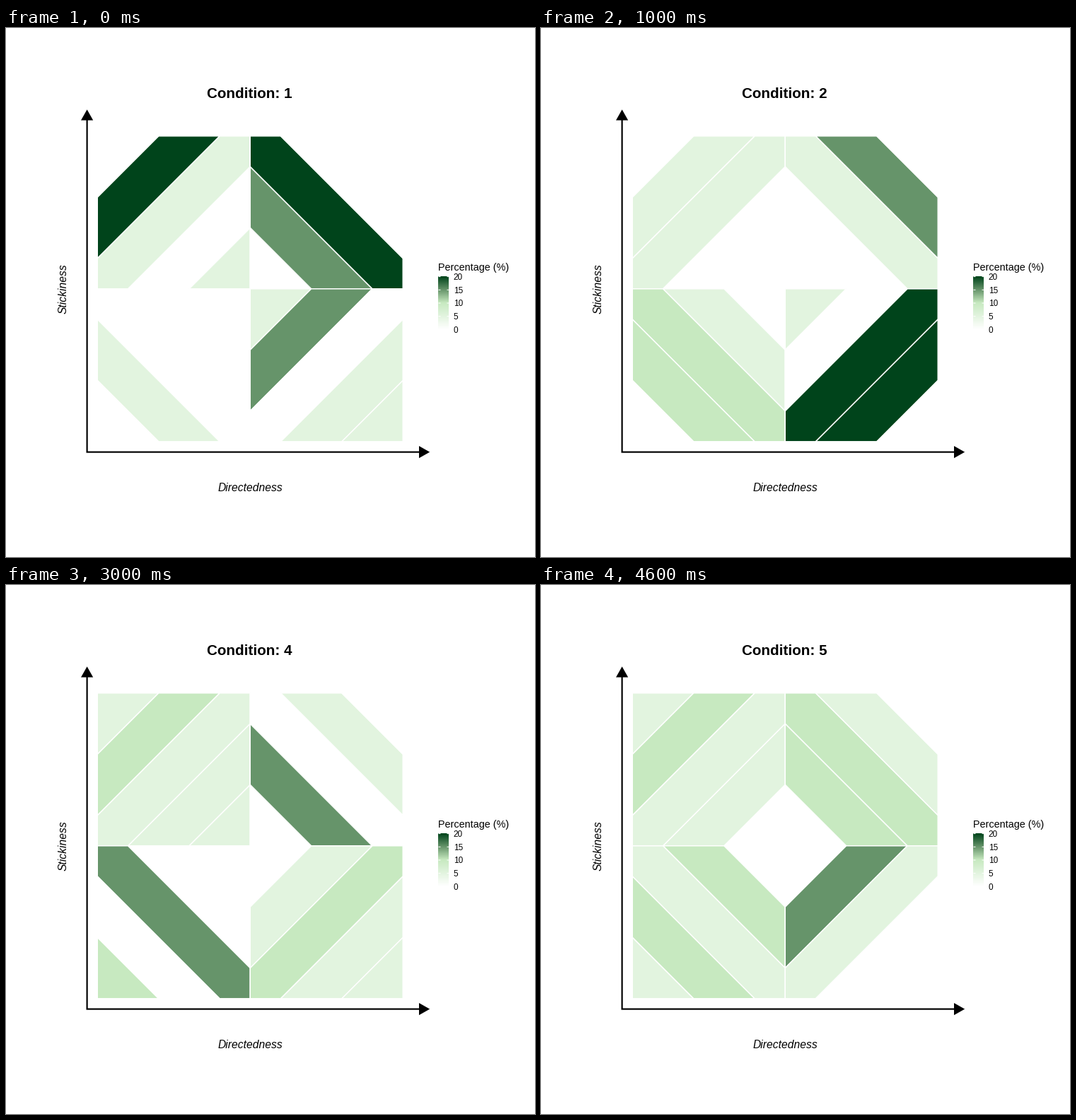
Recreate the animation shown at these times as a matplotlib script. Size 748 px wide and 748 px high, loop 5000 ms.

```python
import numpy as np
import matplotlib.pyplot as plt
from matplotlib.animation import FuncAnimation
from matplotlib.colors import LinearSegmentedColormap
from matplotlib.patches import Polygon

SIZE, DPI = 748, 100
PT = 72 / DPI  # points per pixel
CX, CY, HALF = 345.25, 368.8, 216

SHADES = ["#ffffff", "#e2f4df", "#c7e9c0", "#66946a", "#00441b"]  # 0, 5 .. 20 %
CMAP = LinearSegmentedColormap.from_list("greens", SHADES)
QUADRANTS = [(-1, -1), (1, -1), (-1, 1), (1, 1)]

# Per condition: top left, top right, bottom left, bottom right.
# Each digit is one band, centre outwards, in steps of 5 %.
CONDITIONS = [
    "10140 03400 00010 13011",
    "00110 00130 01220 10440",
    "01210 01101 02331 01111",
    "11121 03010 00302 01211",
    "01121 02210 02121 03100",
]

plt.rcParams["font.family"] = "Liberation Sans"
fig = plt.figure(figsize=(SIZE / DPI, SIZE / DPI), dpi=DPI, facecolor="white")
ax = fig.add_axes([0, 0, 1, 1])


def setup_axes():
    ax.set_xlim(0, SIZE)
    ax.set_ylim(SIZE, 0)
    ax.axis("off")


def text(x, y, s, px, **kw):
    kw.setdefault("va", "baseline")
    return ax.text(x, y, s, fontsize=px * PT, color="black", **kw)


def cut(d):
    """End points of the line x + y = d inside the unit square."""
    a, b = min(d, 1), max(0, d - 1)
    return [(a, b), (b, a)]


def band(k, sx, sy):
    lo, hi = 0.4 * k, 0.4 * (k + 1)
    inner, outer = cut(lo), cut(hi)[::-1]
    if lo < 1 < hi:
        outer = [(0, 1), *outer, (1, 0)]
    pts = np.array(inner + outer)
    return Polygon(pts * [sx * HALF, sy * HALF] + [CX, CY], closed=True,
                   ec="white", lw=1.5 * PT, joinstyle="round")


def draw_arrows():
    ax.plot([114.6, 114.6, 586], [128, 599.6, 599.6], color="black", lw=2.2 * PT,
            solid_joinstyle="miter", solid_capstyle="butt", snap=False)
    for tip in ([(114.6, 115.3), (106, 130.5), (123.2, 130.5)],
                [(599.2, 599.6), (584, 591), (584, 608.2)]):
        ax.add_patch(Polygon(tip, fc="black", lw=0))


def draw_legend():
    left, right, top, bottom = 611.5, 626.5, 351.6, 426.4
    text(611, 343.3, "Percentage (%)", 14.4)
    ax.imshow(np.linspace(1, 0, 150)[:, None], cmap=CMAP, vmin=0, vmax=1,
              extent=(left, right, bottom, top), aspect="auto",
              interpolation="bilinear")
    for i, y in enumerate(np.linspace(bottom, top, 5)):
        for x in (left, right - 3):
            ax.plot([x, x + 3], [y, y], color="white", lw=PT,
                    solid_capstyle="butt", snap=False)
        text(632.8, y + 4.3, str(5 * i), 11.8)


draw_arrows()
draw_legend()
text(CX + 0.3, 655, "Directedness", 15.6, ha="center", style="italic")
text(88.8, 368.3, "Stickiness", 15.6, ha="right", va="center", rotation=90,
     style="italic")
title = text(284.2, 99, "", 20.6, weight="bold")
bands = [ax.add_patch(band(k, *q)) for q in QUADRANTS for k in range(5)]
setup_axes()


def update(i):
    title.set_text(f"Condition: {i + 1}")
    for patch, level in zip(bands, CONDITIONS[i].replace(" ", "")):
        patch.set_facecolor(SHADES[int(level)])
    return [title, *bands]


anim = FuncAnimation(fig, update, frames=len(CONDITIONS), interval=1000,
                     repeat=True, repeat_delay=0)
plt.show()
```
